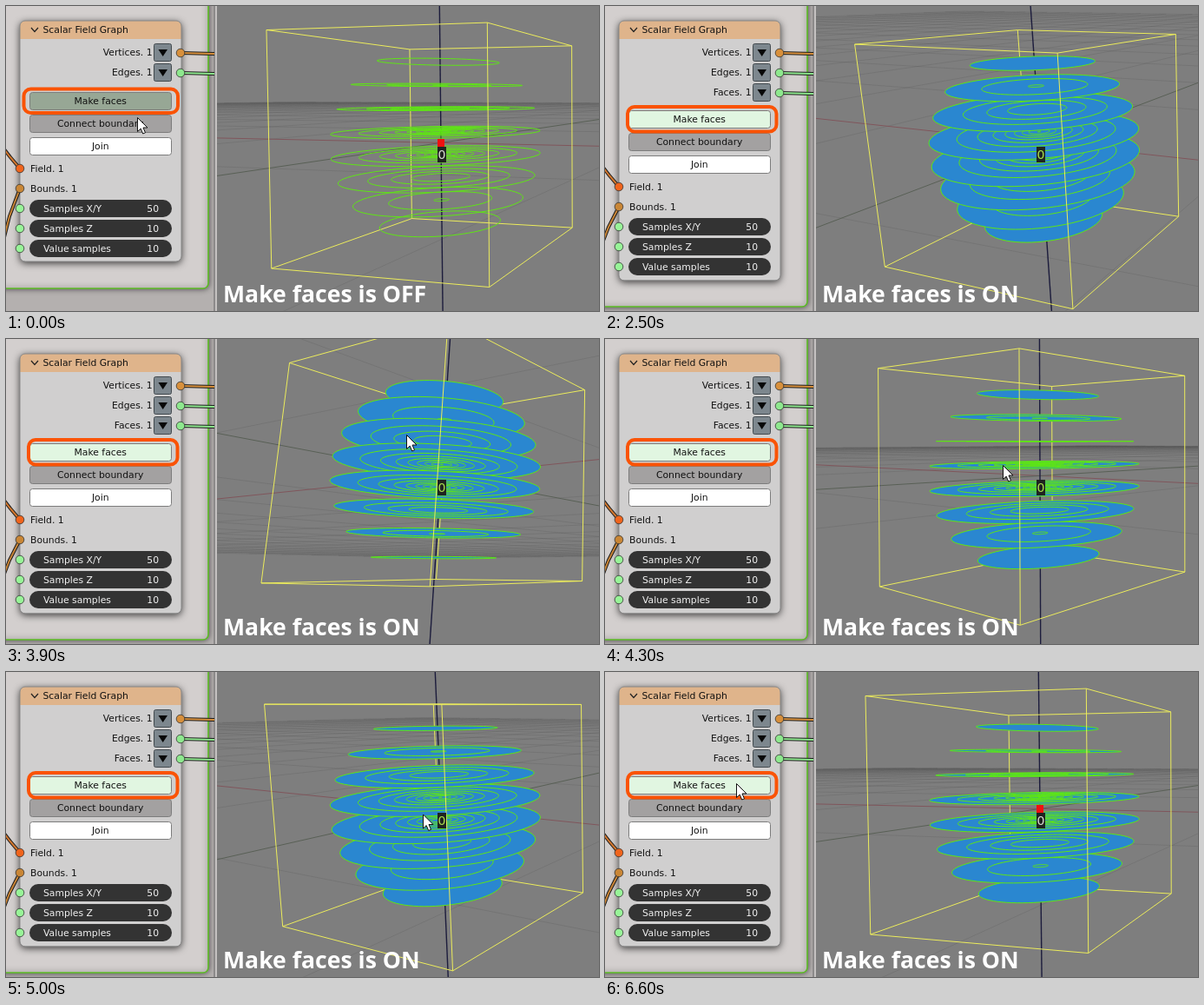
Recreate the animation shown at these times as an HTML page with a canvas. Size 683x351 px, loop 7 s.

```html
<!DOCTYPE html>
<html>
<head>
<meta charset="utf-8">
<style>
html, body { margin: 0; width: 100%; height: 100%; overflow: hidden; background: #808080; }
canvas { display: block; width: 683px; height: 351px; }
</style>
</head>
<body>
<canvas id="stage" width="683" height="351"></canvas>
<script>
const g = document.getElementById('stage').getContext('2d');
const GREEN = '#5fe614', YELLOW = '#ecec5c', UI_FONT = '10.8px "DejaVu Sans", sans-serif';
const LOOP = 7000, RAD = Math.PI / 180;
const CENTER_X = 707, CENTER_Y = 126;

// time, azimuth, elevation, pointer x, pointer y
const ORBIT = [
  [3400, 20.4, 12.2, 487, 176],
  [3900, 28.2, -12, 461, 110],
  [4700, 38, 13.3, 455, 180],
  [5300, 13.5, 1.94, 505, 147]
];
const mix = (a, b, k) => a + (b - a) * k;
const smooth = k => k * k * (3 - 2 * k);

function orbitAt(t) {
  if (t < 2500 || t >= 5300) return ORBIT[3].slice(1);
  if (t <= 3400) return ORBIT[0].slice(1);
  const i = ORBIT.findIndex(k => k[0] > t), from = ORBIT[i - 1], to = ORBIT[i];
  const k = smooth((t - from[0]) / (to[0] - from[0]));
  return from.slice(1).map((v, j) => mix(v, to[j + 1], k));
}

function pointerAt(t) {
  if (t < 1000) return [151, 128];
  if (t < 1500) return null;
  if (t < 2500) return [147, 111];
  if (t < 2900) return null;
  if (t < 3400) {
    const k = Math.min(1, (t - 2800) / 400);
    return [mix(705, 487, k), mix(145, 176, k)];
  }
  if (t <= 5700) return orbitAt(t).slice(2);
  const k = smooth(Math.min(1, (t - 5700) / 900));
  return [mix(505, 151, k), mix(147, 128, k)];
}

function box(x, y, w, h, r, fill, stroke, width = 1) {
  g.beginPath();
  g.roundRect(x, y, w, h, r);
  if (fill) { g.fillStyle = fill; g.fill(); }
  if (stroke) { g.strokeStyle = stroke; g.lineWidth = width; g.stroke(); }
}

function text(s, x, y, color = '#111', align = 'left', font = UI_FONT) {
  g.font = font;
  g.textAlign = align;
  g.fillStyle = color;
  g.fillText(s, x, y);
}

function poly(points, stroke, width, fill, close) {
  g.beginPath();
  points.forEach(p => g.lineTo(p[0], p[1]));
  if (close) g.closePath();
  if (fill) { g.fillStyle = fill; g.fill(); }
  g.strokeStyle = stroke;
  g.lineWidth = width;
  g.stroke();
}

// Perspective camera orbiting the origin, with an off-centre principal point.
function camera(azimuth, elevation) {
  const ca = Math.cos(azimuth * RAD), sa = Math.sin(azimuth * RAD);
  const ce = Math.cos(elevation * RAD), se = Math.sin(elevation * RAD);
  const project = ([x, y, z]) => {
    const right = x * ca + y * sa, away = y * ca - x * sa;
    return [
      119 * right + 501 - CENTER_X,
      157.4 - CENTER_Y - 119 * (z * ce + away * se),
      1 + 0.183 * (away * ce - z * se)
    ];
  };
  const toScreen = ([x, y, q]) => [CENTER_X + x / q, CENTER_Y + y / q];
  return {
    eyeHeight: 0.264 * ce + 5.46 * se,
    point: p => toScreen(project(p)),
    line(a, b, color, width = 1) {
      let p = project(a), q = project(b);
      const near = 0.08;
      if (p[2] < near && q[2] < near) return;
      if (p[2] > q[2]) [p, q] = [q, p];
      if (p[2] < near) {
        const k = (near - p[2]) / (q[2] - p[2]);
        p = p.map((v, i) => mix(v, q[i], k));
      }
      poly([toScreen(p), toScreen(q)], color, width);
    }
  };
}

function drawFloor(cam) {
  const size = 32;
  for (let i = -size; i <= size; i += 2) {
    if (!i) continue;
    cam.line([i, -size, 0], [i, size, 0], 'rgba(60,60,60,.15)');
    cam.line([-size, i, 0], [size, i, 0], 'rgba(60,60,60,.15)');
  }
  cam.line([-size, 0, 0], [size, 0, 0], '#80565c');
  cam.line([0, -size, 0], [0, size, 0], '#596056');
  cam.line([0, 0, -4], [0, 0, 4], '#1c1c3c', 1.4);
}

function drawBox(cam, far) {
  for (const u of [-1, 1]) for (const v of [-1, 1]) {
    const edges = [
      [[u, v, -1], [u, v, 1]],
      [[u, -1, v], [u, 1, v]],
      [[-1, u, v], [1, u, v]]
    ];
    const lower = v === (cam.eyeHeight > 0 ? -1 : 1);
    const hidden = [u === -1 && v === 1, u === -1 && lower, u === 1 && lower];
    edges.forEach(([a, b], i) => { if (hidden[i] === far) cam.line(a, b, YELLOW); });
  }
}

// Nested spheres cut by evenly spaced horizontal planes.
function drawContours(cam, filled) {
  const planes = [-7, -5, -3, -1, 1, 3, 5, 7].map(n => n / 9);
  planes.sort((a, b) => Math.abs(b - cam.eyeHeight) - Math.abs(a - cam.eyeHeight));
  for (const z of planes) {
    for (let k = 0; k < 9; k++) {
      const r2 = (0.957 * 0.765 ** k) ** 2 - z * z;
      if (r2 <= 0) break;
      const r = Math.sqrt(r2), ring = [];
      for (let i = 0; i < 72; i++) {
        const angle = i * 5 * RAD;
        ring.push(cam.point([r * Math.cos(angle), r * Math.sin(angle), z]));
      }
      poly(ring, GREEN, 1, filled && k === 0 && '#2a87d0', true);
    }
  }
}

function drawView(t) {
  const [azimuth, elevation] = orbitAt(t), cam = camera(azimuth, elevation);
  const filled = t >= 2500, orbiting = t >= 2500 && t < 5300;
  g.save();
  g.beginPath();
  g.rect(243, 0, 440, 351);
  g.clip();
  g.fillStyle = '#7e7e7e';
  g.fillRect(243, 0, 440, 351);
  drawFloor(cam);
  drawBox(cam, true);
  drawContours(cam, filled);
  drawBox(cam, false);
  if (!orbiting) {
    g.fillStyle = '#f01010';
    g.fillRect(497, 153, 8, 9);
  }
  g.fillStyle = '#1f2320';
  g.fillRect(497, 162, 10, 18);
  text('0', 502, 176, orbiting ? '#a6dc4c' : '#d8d8d0', 'center', '14px "DejaVu Sans", sans-serif');
  text('Make faces is ' + (t < 2000 ? 'OFF' : 'ON'), 250, 341, '#fff', 'left',
    'bold 26.6px "Open Sans", "Noto Sans", sans-serif');
  g.restore();
}

function socket(x, y, color) {
  g.beginPath();
  g.arc(x, y, 4.8, 0, 7);
  g.fillStyle = color;
  g.fill();
  g.strokeStyle = '#333';
  g.lineWidth = 0.8;
  g.stroke();
}

function wire(points, color) {
  poly(points, '#1c1c1c', 4);
  poly(points, color, 2);
}

function output(label, y, color) {
  wire([[201, y], [240, y + 1]], color);
  socket(201, y, color);
  text(label, 168.5, y + 3, '#111', 'right');
  box(170.5, y - 10.5, 20, 20, 2, '#7d878e', '#42494e');
  g.beginPath();
  g.moveTo(175.5, y - 4);
  g.lineTo(186, y - 4);
  g.lineTo(180.7, y + 4);
  g.fillStyle = '#080808';
  g.fill();
}

function button(label, y, fill) {
  box(27.5, y + 0.5, 163, 20, 3, fill, '#7c7c7c');
  text(label, 108.7, y + 14, '#111', 'center');
}

function slider(label, value, y) {
  box(27, y - 10, 164, 20, 10, '#333');
  text(label, 43, y + 4, '#f2f2f2');
  text(value, 176, y + 4, '#f2f2f2', 'right');
  socket(16, y, '#98f498');
}

function drawNode(t) {
  const on = t >= 2000, dy = on ? 21 : 0;
  g.fillStyle = '#b4b0af';
  g.fillRect(0, 0, 243, 351);
  g.save();
  g.shadowColor = 'rgba(0,0,0,.55)';
  g.shadowBlur = 6;
  box(-20, -20, 253, 345 + dy, 6, '#d3cfce', '#5cbc24', 1.6);
  g.restore();
  g.fillStyle = '#8c8a8a';
  g.fillRect(239, 0, 2, 351);
  g.fillStyle = '#c4c1c0';
  g.fillRect(241, 0, 2, 351);

  g.save();
  g.shadowColor = 'rgba(0,0,0,.75)';
  g.shadowBlur = 9;
  g.shadowOffsetY = 2;
  box(16, 17, 186, 277 + dy * 1.04, 6, '#d0cfcf');
  g.restore();
  box(16, 17, 186, 21, [6, 6, 0, 0], '#dfb48b');
  box(16, 17, 186, 277 + dy * 1.04, 6, null, '#888');
  poly([[29, 25], [33, 29.5], [37, 25]], '#222', 1.2);
  text('Scalar Field Graph', 42.5, 31);

  output('Vertices. 1', 54, '#d8903c');
  output('Edges. 1', 77, '#8ee88e');
  if (on) output('Faces. 1', 100, '#8ee88e');

  const makeFill = on ? '#e1f6e1' : t >= 1000 ? '#a3b4a1' : '#97a795';
  button('Make faces', 99 + dy, makeFill);
  button('Connect boundary', 125 + dy, t >= 500 && t < 1000 ? '#b0aeae' : '#a3a1a1');
  button('Join', 151 + dy, '#fff');

  wire([[-2, 165 + dy], [5, 174 + dy], [16, 187 + dy]], '#d0762e');
  wire([[-2, 266 + dy * 0.2], [4, 242 + dy * 0.6], [16, 210 + dy]], '#c88436');
  socket(16, 187 + dy, '#f0641c');
  socket(16, 210 + dy, '#c98636');
  text('Field. 1', 28, 191 + dy);
  text('Bounds. 1', 28, 214 + dy);
  slider('Samples X/Y', '50', 233 + dy);
  slider('Samples Z', '10', 256 + dy);
  slider('Value samples', '10', 279 + dy);

  if (on) box(26, 116, 171.5, 28.5, 8, null, '#fa5305', 4);
  else box(20.5, 95.5, 177.5, 27.5, 8, null, '#fa5305', 4);
}

function drawPointer([x, y]) {
  const shape = [[0, 0], [0, 16], [3.7, 12.6], [6.2, 18.5], [9, 17.3], [6.5, 11.5], [11.5, 11.5]];
  poly(shape.map(([dx, dy]) => [x + 0.5 + dx, y + 0.5 + dy]), '#111', 1, '#fff', true);
}

function frame(now) {
  const t = Math.floor(now % LOOP / 100) * 100;
  drawNode(t);
  drawView(t);
  const pointer = pointerAt(t);
  if (pointer) drawPointer(pointer);
  requestAnimationFrame(frame);
}
requestAnimationFrame(frame);
</script>
</body>
</html>
```
